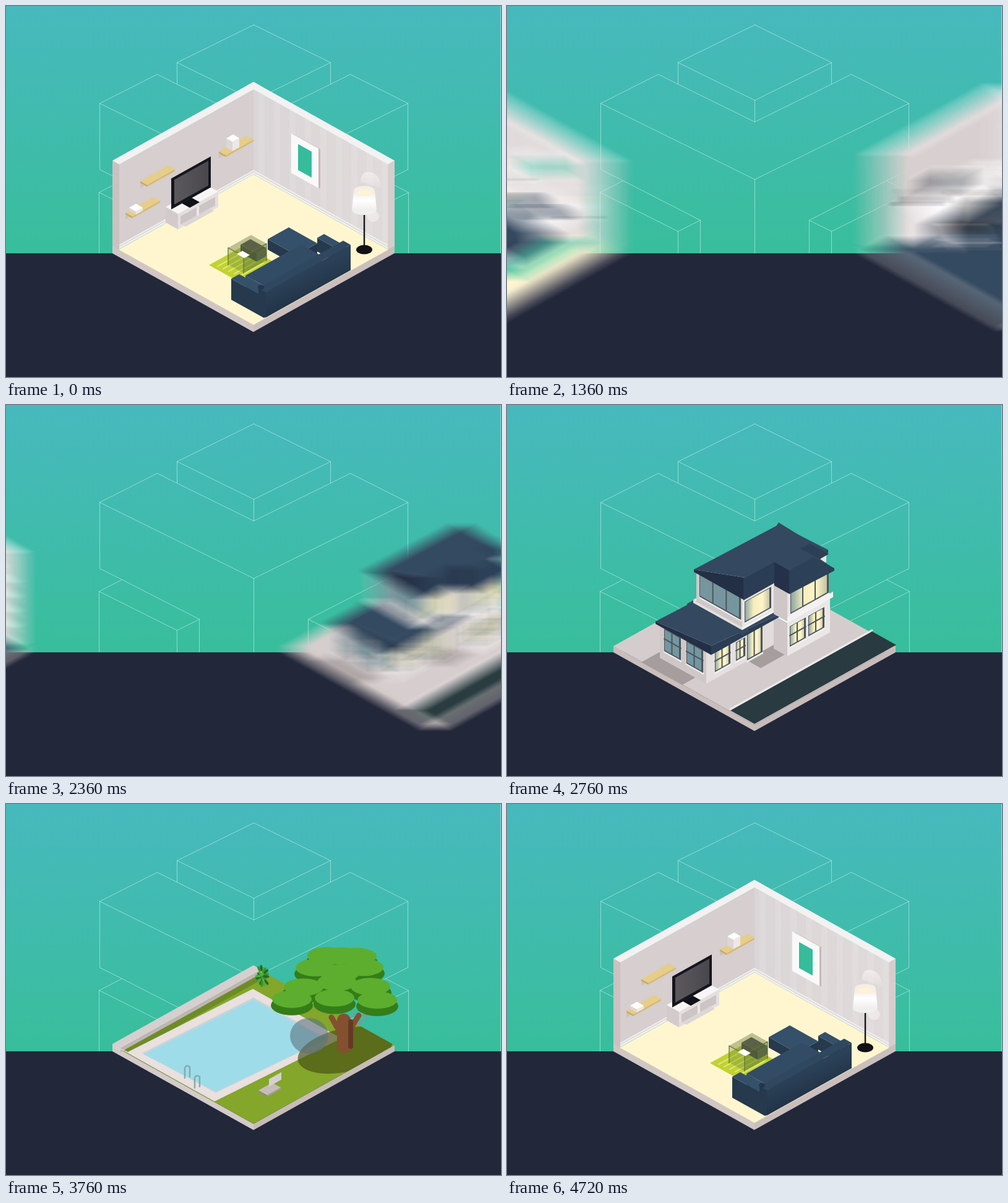
An HTML page with a canvas that plays this animation: 800 px wide and 600 px high, repeating every 5000 ms.

```html
<!DOCTYPE html>
<html lang="en">
<head>
<meta charset="utf-8">
<title>Isometric rooms</title>
<style>
html, body { margin: 0; width: 100%; height: 100%; overflow: hidden; background: #22283a; }
canvas { display: block; width: 800px; height: 600px; }
</style>
</head>
<body>
<canvas id="stage" width="800" height="600"></canvas>
<script>
const SLOPE = 0.558, SPACING = 900, LOOP = 5000, STEP = 40, SLIDE = 600, MARGIN = 50;
const STARTS = [240, 1200, 2160, 3160, 4120];
const GREEN = '#36bc9b', NAVY = '#34495f', DEEP = '#232f45', TRIM = '#f3f1f1';
// Box colours: top, left face, right face
const WOOD = ['#ead597', '#d9bd76', '#e1c780'];
const SHELF = ['#e6cd88', '#c9ab62', '#d6ba70'];
const PALE = ['#f7f5f5', '#d3cacb', '#e4dfdf'];
const PAPER = ['#ffffff', '#dcd6d6', '#ebe8e8'];
const SOFA = ['#35506a', '#26394d', '#24384c'];

let g;

function makeLayer(width = 800) {
  const c = document.createElement('canvas');
  c.width = width;
  c.height = 600;
  return c.getContext('2d');
}
function lin(x0, y0, x1, y1, ...colors) {
  const grad = g.createLinearGradient(x0, y0, x1, y1);
  colors.forEach((c, i) => grad.addColorStop(i / (colors.length - 1), c));
  return grad;
}
function fill(color, d) { g.fillStyle = color; g.fill(new Path2D(d)); }
function poly(color, points) { fill(color, `M${points}Z`); }
function line(color, width, d) {
  g.strokeStyle = color;
  g.lineWidth = width;
  g.stroke(new Path2D(d));
}
// Isometric stroke of a given run; dir 1 descends to the right, -1 climbs
function run(color, width, x, y, length, dir = 1) {
  line(color, width, `M${x},${y}l${length},${dir * length * SLOPE}`);
}
function oval(color, x, y, rx, ry, turn = 0) {
  g.fillStyle = color;
  g.beginPath();
  g.ellipse(x, y, rx, ry, turn, 0, 7);
  g.fill();
}
// Upright parallelogram on a wall
function panel(color, x, y, w, h, dir = 1) {
  const r = dir * w * SLOPE;
  fill(color, `M${x},${y}l${w},${r}v${h}l${-w},${-r}Z`);
}
// Lying parallelogram from its left corner: a goes up right, b down right
function tile(color, x, y, a, b) {
  fill(color, `M${x},${y}l${a},${-a * SLOPE} ${b},${b * SLOPE} ${-a},${a * SLOPE}Z`);
}
function box(x, y, a, b, h, [top, left, right]) {
  panel(left, x, y, b, h);
  panel(right, x + b, y + b * SLOPE, a, h, -1);
  tile(top, x, y, a, b);
}
function clipped(path, draw) {
  g.save();
  g.clip(path);
  draw();
  g.restore();
}

function slab(floor) {
  panel('#d0c6c4', 172, 388, 228, 12);
  panel('#cabfbc', 400, 515, 228, 12, -1);
  tile(floor, 182, 394, 218, 218);
}
function sideCuts(y) {
  panel('#cbc1c0', 172, y, 11, 145);
  panel('#d6cece', 617, y + 6, 11, 145, -1);
}
function shell() {
  sideCuts(250);
  slab('#fff6cf');
  panel('#d6cecf', 183, 256, 217, 137, -1);
  panel(lin(400, 0, 617, 0, '#dad5d6', '#e0dada'), 400, 135, 217, 137);
  for (let x = 8; x < 210; x += 25) panel('rgba(255,255,255,.1)', 400 + x, 135 + x * SLOPE, 10, 137);
  for (const dir of [-1, 1]) {
    const x = dir < 0 ? 183 : 400, y = dir < 0 ? 386 : 265;
    panel('#f1eeee', x, y, 217, 7, dir);
    run('#d2c9ca', 1, x, y + 3, 217, dir);
  }
  tile(TRIM, 172, 250, 228, 11);
  tile(TRIM, 389, 129, 11, 228);
}
function shade(x, y, w, h) {
  const r = w / 2, e = r * 0.4;
  fill(lin(0, y, 0, y + h, '#f1eae2', '#fff', '#f1eeee'),
    `M${x - r + 3},${y}L${x - r},${y + h}A${r},${e} 0 0 0 ${x + r},${y + h}L${x + r - 3},${y}Z`);
  oval('#f7efe4', x, y, r - 3, e);
}
function glow(x, y, w) {
  const r = w / 2;
  fill(lin(0, y - r, 0, y + r, '#f3efee', 'rgba(243,239,238,.1)'),
    `M${x - r},${y + 4}Q${x - r + 2},${y - 15} ${x},${y - 11}T${x + r},${y + 15}Z`);
}
function picture(x, y, w, h, border) {
  panel('#c6b9b5', x + 3, y + 1, w, h);
  panel('#faf9f9', x, y, w, h);
  panel(GREEN, x + border, y + border * (1 + SLOPE), w - 2 * border, h - 2 * border);
}

function livingRoom() {
  shell();
  for (const [x, y] of [[217, 283], [193, 334], [344, 235]]) {
    panel('rgba(120,105,105,.12)', x, y + 4, 45, 7, -1);
    box(x, y, 45, 11, 3, SHELF);
  }
  box(199, 326, 11, 11, 5, PAPER);
  box(356, 214, 11, 10, 15, PAPER);

  box(258, 325, 65, 20, 25, PALE);
  panel('#cdc4c5', 282, 340, 56, 14, -1);
  tile('#ddd6d6', 283, 353, 46, 7);
  panel('#ebe7e7', 308, 325, 4, 15, -1);
  tile('#111218', 284, 319, 16, 13);
  panel('#15161d', 267, 279, 64, 50, -1);
  panel(lin(272, 0, 328, 0, '#5b595c', '#48474c'), 272, 281, 55, 40, -1);

  picture(461, 206, 44, 64, 11);
  glow(590, 280, 34);
  oval('rgba(244,240,239,.65)', 593, 340, 10, 9, .4);
  line('#18181c', 2.4, 'M579,334V393');
  oval('#111116', 579, 394, 13, 7.5);
  shade(579, 299, 40, 31);
  oval('#fdf3d6', 579, 302, 11, 5);

  tile('#c1d232', 328, 419, 57, 56);
  for (let i = 0; i < 5; i++) run('#e0e88b', 2, 342 + i * 9, 421 + i * 4, 38, -1);
  box(379, 386, 16, 26, 13, ['#59585a', '#4c4d4a', '#666462']);
  box(359, 391, 37, 25, 27, ['rgba(92,110,45,.4)', 'rgba(90,120,40,.3)', 'rgba(80,108,40,.5)']);
  line('#65752f', 1.3, 'M359,419V391l25,14v27M421,412V385');
  run('#65752f', 1.3, 384, 405, 37, -1);
  tile('#fff', 373, 401, 9, 12);

  box(503, 375, 11, 42, 22, SOFA);
  box(423, 377, 34, 46, 17, SOFA);
  box(387, 436, 90, 34, 20, ['#334c65', ...SOFA]);
  box(364, 441, 13, 53, 34, SOFA);
  box(408, 456, 137, 12, 41, ['#30485f', '#26394d', lin(420, 460, 440, 503, '#2b4158', '#1f3043')]);
  oval('#23364a', 412, 455, 5, 4);
}

function bedLamp(x, y) {
  glow(x + 8, y - 13, 28);
  shade(x, y, 29, 24);
  tile('#4a4340', x - 2, y + 30, 6, 5);
}
function plant(x, y) {
  for (let i = 0; i < 22; i++) {
    const a = i * 2.4, r = 4 + i % 4 * 2.4;
    oval(['#1f6b25', '#35922f', '#4dae38'][i % 3], x + Math.cos(a) * r, y + Math.sin(a) * r * 1.15, 5, 2, a);
  }
}
function pillow(x, y) {
  oval('#e1dcdc', x, y + 2, 24, 12, .4);
  oval('#2b3f55', x, y, 22, 11, .4);
}

function bedroom() {
  shell();
  g.translate(-24, 0);
  panel(lin(240, 0, 294, 0, 'rgba(255,255,255,.05)', 'rgba(255,255,255,.4)'), 240, 257, 54, 118, -1);
  run('#ebe7e7', 1.5, 240, 257, 54, -1);

  box(318, 291, 63, 13, 40, WOOD);
  for (const y of [309, 322]) run('#f3e5b8', 1.8, 345, y, 37, -1);
  box(328, 284, 10, 10, 3, PAPER);

  // Wardrobe
  panel('#dcd5d6', 207, 355, 55, 38);
  panel('#d9be76', 207, 270, 55, 92);
  for (const y of [293, 363]) box(207, y, 23, 54, 4, ['#fff', '#e1dbdb', '#e1dbdb']);
  run('#6d6257', 1.5, 216, 302, 44);
  for (let x = 4; x < 44; x += 7) line('#a5884f', 2, `M${216 + x},${304 + x * SLOPE}l-4,14m4,-14l6,13`);
  panel('#dfc57f', 262, 300, 21, 124, -1);
  tile('#efdb9f', 207, 269, 22, 55);
  tile('#e0c681', 213, 269, 16, 48);

  tile(GREEN, 361, 376, 114, 127);
  panel('#f1eeee', 502, 277, 88, 15);
  run('#fff', 2, 502, 276, 110);
  box(395, 362, 106, 84, 18, ['#f7f5f5', '#eeeaea', '#dcd5d5']);
  run('#d5cdce', 1.5, 395, 370, 84);
  tile('#f7f5f5', 473, 318, 34, 78);
  tile('#334a60', 397, 361, 71, 83);
  panel('#22304a', 480, 406, 70, 15, -1);
  run('#27394f', 1.5, 456, 329, 83);
  pillow(515, 314);
  pillow(552, 333);
  box(482, 281, 10, 16, 3, PALE);
  box(590, 343, 10, 16, 3, PALE);
  bedLamp(495, 251);
  bedLamp(604, 312);
  picture(535, 230, 47, 35, 6);

  box(282, 424, 18, 84, 15, WOOD);
  plant(298, 408);
  tile('#17181c', 318, 439, 12, 12);
  panel('#303036', 308, 397, 44, 30);
  plant(367, 445);
}

function sunlight() {
  // Three windows, each cast as a near and a far patch of a slanted sheet
  for (let col = 0; col < 3; col++) {
    for (const [from, to] of [[.05, .6], [.7, 1]]) {
      const x = 411 + col * 44 + from * 29, y = 296 + col * 44 * SLOPE + from * 45;
      const dx = (to - from) * 29, dy = (to - from) * 45;
      fill('#c8bcb9', `M${x},${y}l30,${30 * SLOPE} ${dx},${dy} -30,${-30 * SLOPE}Z`);
    }
  }
}
function windowWall() {
  const panes = new Path2D();
  panel('#ece8e8', 402, 146, 130, 146);
  for (let i = 0; i < 3; i++) {
    const x = 411 + i * 44, w = 35 - i * 2, y = 158 + i * 44 * SLOPE, drop = w * SLOPE;
    panel(lin(0, y, 0, y + 50, '#e2d9d5', '#f8f6f5'), x, y, w, 32);
    panel(lin(0, y + 44, 0, y + 150, '#fbfafa', '#f2eeec', '#d9c8bc', '#bfa99b'), x, y + 45, w, 85);
    panes.addPath(new Path2D(`M${x},${y + 45}l${w},${drop}v85l${-w},${-drop}Z`));
    line('#d3c9c8', 1, `M${x},${y}v130M${x + w},${y + drop}v130`);
  }
  clipped(panes, () => {
    for (let k = 0; k < 8; k++) run('#b5a398', .8, 424, 272 + k * 7, 110);
    for (let y = 231; y < 275; y += 12) line('#758190', 1.7, `M411,${y + 7}l13,-7 110,${110 * SLOPE}`);
    for (let x = 0; x < 100; x += 46) line('#596675', 2.3, `M${424 + x},${230 + x * SLOPE}v50`);
  });
  panel('#f8f6f6', 402, 190, 129, 8);
  run('#d0c6c5', 1, 402, 199, 129);
  panel('#f7f5f5', 402, 287, 129, 5);
}

function office() {
  sideCuts(239);
  slab('#33495f');
  for (let i = 0; i < 8; i++) {
    const x = i * 31, y = 394 + x * SLOPE;
    run('#24364a', 1, 183 + x, y, 217, -1);
    run('#24364a', 1, 400 - x, y - 217 * SLOPE, 217);
  }
  line('#22344a', 2, 'M183,394L400,516 617,394');
  sunlight();

  panel('#d7cfd0', 183, 245, 195, 148, -1);
  panel('#e1dcdc', 378, 135, 26, 148);
  panel('#f3f0f0', 183, 386, 195, 6, -1);
  windowWall();
  panel('#e2dcdd', 528, 218, 24, 149);
  panel('#d6cecf', 552, 231, 21, 148, -1);
  panel('#dfd9da', 573, 219, 44, 148);
  panel('#f7f5f5', 552, 373, 21, 6, -1);
  panel('#f7f5f5', 573, 361, 44, 6);
  for (let y = 266; y < 345; y += 24) {
    panel('rgba(140,125,125,.18)', 572, y + 8, 45, 7);
    box(562, y, 10, 44, 4, ['#fff', '#e9e5e5', '#d2cacb']);
  }
  box(565, 254, 8, 20, 11, PAPER);
  tile(TRIM, 172, 239, 206, 11);
  tile(TRIM, 367, 130, 11, 174);
  tile(TRIM, 541, 225, 32, 11);
  tile(TRIM, 562, 213, 11, 55);

  // Cabinet and printer
  box(332, 264, 29, 26, 39, PALE);
  for (const y of [290, 303]) run('#d0c8c8', 1, 358, y, 29, -1);
  box(318, 267, 19, 20, 9, PAPER);
  tile('#d8d1d1', 323, 266, 13, 13);
  box(353, 253, 12, 12, 5, PAPER);

  // Desk
  panel('rgba(120,105,105,.1)', 210, 325, 10, 50, -1);
  panel('#22344a', 270, 348, 76, 22, -1);
  panel('#dcd6d6', 345, 301, 13, 55, -1);
  panel('#f1eded', 220, 322, 50, 48);
  panel('#d6cecd', 264, 347, 6, 50);
  box(220, 322, 89, 50, 3, ['#fcfbfb', '#e2dcdc', '#d9d2d3']);
  box(273, 322, 26, 10, 2, PAPER);
  tile('#6f625d', 308, 302, 13, 13);
  oval('#d9d1cf', 321, 302, 4, 2.5);
  tile('#e1dbdb', 266, 312, 20, 8);
  panel('#f9f8f8', 255, 281, 44, 34, -1);
  panel(lin(256, 0, 297, 0, '#545a60', '#3a4149'), 257, 282, 39, 28, -1);
  oval('#15171b', 232, 320, 7, 4);
  line('#15171b', 2, 'M232,319V296L244,309');
  oval('#202329', 245, 313, 7, 6, .4);

  // Chair
  for (let i = 0; i < 5; i++) {
    const a = .05 + i * Math.PI * .4, x = 317 + Math.cos(a) * 25, y = 384 + Math.sin(a) * 13;
    line('#dcd6d9', 4, `M317,371V381L${x},${y}`);
    oval('#26262b', x, y + 1, 3, 2.5);
  }
  oval('#27292e', 312, 358, 29, 12);
  fill(lin(320, 320, 352, 345, '#303136', '#1c1d21'), 'M324,319L346,308Q354,307 355,314L344,355Q334,366 319,362Z');
  line('#efecee', 4, 'M298,353Q314,353 313,374');
}

const warm = (x, w) => lin(x, 0, x + w, 0, '#86a0a4', '#f6edbd', '#fff5c9', '#b9b89f');
function glass(x, y, w, h, dir, panes, color, bar = false) {
  const pane = (w - 2) / panes;
  panel('#f1eeed', x - 1, y + h - dir, w + 2, 3, dir);
  panel('#4b5558', x, y, w, h, dir);
  for (let i = 0; i < panes; i++) {
    const left = 1 + i * pane;
    panel(color, x + left, y + 1 + dir * left * SLOPE, pane - 2, h - 3, dir);
  }
  if (bar) run('#4b5558', 2, x, y + h * .45, w, dir);
}
// Roof whose front corner is lifted above the eaves
function roof(x, y, a, b, lift) {
  const fx = x + b, fy = y + b * SLOPE, rx = fx + a, ry = fy - a * SLOPE;
  poly(NAVY, `${x},${y - 4} ${x + a},${y - a * SLOPE} ${rx},${ry - 4} ${fx},${fy - lift}`);
  poly(DEEP, `${x},${y - 4} ${fx},${fy - lift} ${fx},${fy} ${x},${y}`);
  poly('#2b3d54', `${rx},${ry - 4} ${fx},${fy - lift} ${fx},${fy} ${rx},${ry}`);
}

function house() {
  box(172, 390, 228, 228, 10, ['#d5cdcd', '#c9bebc', '#c7bcba']);
  tile('#293b40', 361, 494, 229, 39);
  run('#eeeaea', 3, 361, 492, 229, -1);
  tile('#a69e9d', 217, 416, 30, 66);
  tile('#a69e9d', 386, 412, 44, 24);
  const blue = lin(0, 270, 0, 430, '#78959d', '#7297a3');

  box(247, 355, 66, 75, 54, ['#fff', '#d0c8c8', '#e5e0df']);
  panel('#e2dcdb', 386, 366, 46, 47, -1);
  for (const x of [254, 290]) glass(x, 362 + (x - 254) * SLOPE, 27, 36, 1, 2, blue, true);
  glass(336, 400, 25, 32, -1, 2, warm(336, 25), true);
  glass(370, 384, 15, 30, -1, 2, warm(370, 15), true);
  glass(388, 368, 25, 45, -1, 2, warm(388, 25));
  box(431, 340, 69, 22, 54, ['#fff', '#cfc7c7', '#ebe7e6']);
  for (const x of [457, 487]) glass(x, 358 - (x - 457) * SLOPE, 26, 33, -1, 2, warm(x, 26), true);
  roof(240, 354, 113, 90, 15);
  tile(NAVY, 290, 322, 12, 90);

  box(301, 315, 55, 79, 5, [TRIM, '#e4dfde', TRIM]);
  box(306, 268, 51, 74, 50, ['#fff', '#d0c8c8', '#e8e4e3']);
  glass(311, 273, 67, 37, 1, 3, blue);
  glass(384, 318, 43, 34, -1, 1, warm(384, 43));
  box(431, 284, 67, 22, 54, ['#fff', '#cfc7c7', '#e8e4e3']);
  glass(458, 304, 62, 34, -1, 3, warm(458, 62));
  panel(TRIM, 453, 343, 74, 9, -1);
  panel('#e9e5e4', 505, 248, 11, 12, -1);

  roof(302, 270, 137, 80, 36);
  panel('#2b3d54', 382, 281, 50, 35, -1);
  poly(NAVY, '382,281 432,254 456,268 529,265 506,249 520,240 439,190');
  panel('#243148', 432, 254, 24, 38);
  poly('#2c4058', '456,268 495,246 529,264 529,268 456,306');
  tile('#2c3f55', 474, 232, 15, 31);
}

function canopy() {
  // Rows widen downwards; each lies over the shaded underside of its own leaves
  for (let row = 0; row < 4; row++) {
    const y = 248 + row * 23, spread = 24 + row * 15, centre = 691 - row * 4;
    for (const [color, drop, grow] of [['#347d19', 8, 0], ['#5dad2e', -2, -2]]) {
      for (let k = -1; k <= 1; k++) {
        const wave = Math.sin(row * 2 + k * 3) * 5;
        oval(color, centre + k * spread, y + wave + drop, 34 + grow, 16 + grow);
      }
    }
  }
}

function pool() {
  box(172, 390, 228, 228, 10, ['#83a62b', '#d3cbca', '#c7bcb8']);
  g.translate(-148, 0);
  tile('#6d8c26', 332, 394, 216, 16);
  box(320, 388, 228, 13, 6, ['#d5cfcf', '#d5cfcf', '#bdb6b5']);
  poly('#e9e0df', '320,389 345,401 547,299 690,379 485,481');
  poly('#c3d5d8', '368,403 548,313 667,380 487,467');
  poly('#9fdce9', '371,405 548,317 663,381 487,465');
  clipped(new Path2D('M320,390L548,263 776,390 548,517Z'), () => {
    oval('rgba(70,78,18,.65)', 696, 398, 78, 35, -.22);
    oval('rgba(94,116,128,.6)', 638, 375, 31, 29);
  });
  plant(562, 278);

  for (const x of [437, 453]) line('#84aab1', 2.5, `M${x},${x + 6}v-16q2,-6 8,-2v16`);
  box(556, 463, 22, 14, 3, ['#c6bdb8', '#8b8a82', '#a29c92']);
  panel('#d6d1d0', 573, 445, 20, 12, -1);
  line('#8d9295', 2, 'M709,338l24,5 -16,14Z');

  line('#85502f', 22, 'M694,350V392');
  line('#85502f', 9, 'M674,345l16,28M718,342l-16,26');
  line('#653a25', 8, 'M705,352V392');
  canopy();
}

function render(scene) {
  g = makeLayer();
  g.lineJoin = g.lineCap = 'round';
  scene();
  return g.canvas;
}
function backdrop() {
  g.fillStyle = lin(0, 0, 0, 400, '#47b9be', '#38be9b');
  g.fillRect(0, 0, 800, 400);
  g.fillStyle = '#22283a';
  g.fillRect(0, 400, 800, 200);
  const half = 'M400,30L276,91 400,152M276,91V126L400,187M276,126L244,110 151,157 400,280'
    + 'M151,157V264L187,282M150,400V301L187,282 312,346 276,364 150,301M276,364V400M312,346V400';
  const wire = 'rgba(220,250,240,.52)';
  g.fillStyle = wire;
  g.fillRect(799, 0, 1, 400);
  g.translate(.5, .5);
  line(wire, 1, half + 'M400,152V187M400,280V400');
  g.translate(800, 0);
  g.scale(-1, 1);
  line(wire, 1, half);
  g.fillStyle = '#22283a';
  g.fillRect(0, 399.5, 801, 3);
}

const bg = render(backdrop);
const scenes = [livingRoom, bedroom, office, house, pool].map(render);
const stage = document.getElementById('stage').getContext('2d');
let front = makeLayer(800 + 2 * MARGIN), back = makeLayer(800 + 2 * MARGIN);

// Cubic Bezier (.36, 0, 0, 1)
function ease(p) {
  if (p <= 0) return 0;
  if (p >= 1) return 1;
  let lo = 0, hi = 1;
  for (let i = 0; i < 24; i++) {
    const s = (lo + hi) / 2;
    if (1.08 * s * (1 - s) ** 2 + s ** 3 < p) lo = s; else hi = s;
  }
  return lo * lo * (3 - 2 * lo);
}
const position = t => STARTS.reduce((sum, start) => sum + ease((t - start) / SLIDE), 0);

function draw(now) {
  const t = Math.floor(now % LOOP / STEP) * STEP;
  const pos = position(t);
  const smear = (position(t + STEP / 4) - position(t - STEP / 4)) * SPACING;
  front.clearRect(0, 0, 900, 600);
  for (let i = Math.floor(pos); i <= Math.ceil(pos); i++) {
    front.drawImage(scenes[i % scenes.length], MARGIN + (i - pos) * SPACING, 0);
  }
  // Repeated averaging of two shifted copies gives a box-shaped motion blur
  for (let shift = smear / 4; shift > .2; shift /= 2) {
    back.clearRect(0, 0, 900, 600);
    back.globalAlpha = .5;
    back.globalCompositeOperation = 'lighter';
    back.drawImage(front.canvas, -shift, 0);
    back.drawImage(front.canvas, shift, 0);
    back.globalAlpha = 1;
    back.globalCompositeOperation = 'source-over';
    [front, back] = [back, front];
  }
  stage.drawImage(bg, 0, 0);
  stage.drawImage(front.canvas, -MARGIN, 0);
}

const begin = performance.now();
function tick() {
  draw(performance.now() - begin);
  requestAnimationFrame(tick);
}
tick();
</script>
</body>
</html>
```
